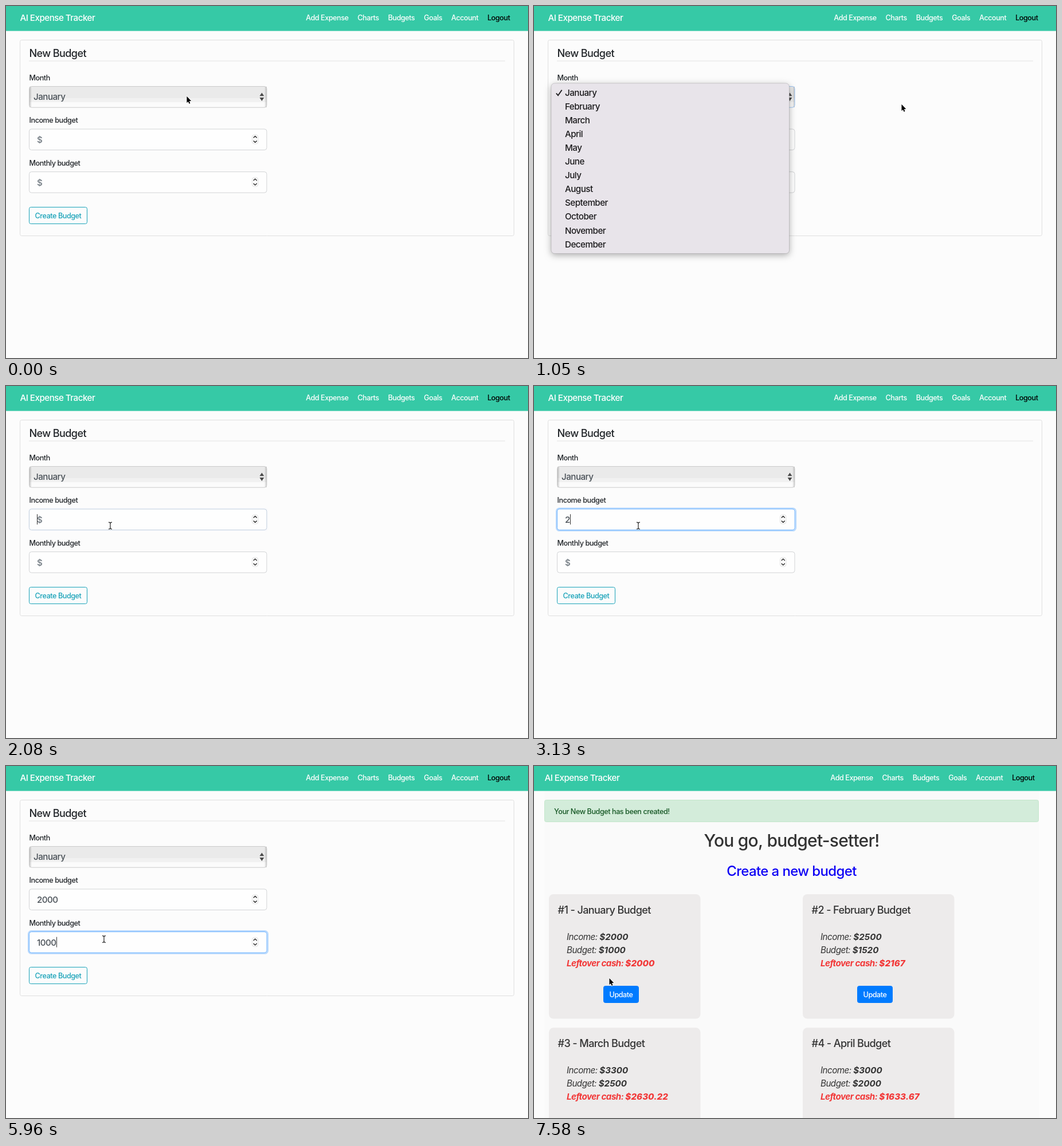
Recreate the animation shown at these times as an HTML page with a canvas. Size 911 px wide and 615 px high, loop 8 s.

```html
<!DOCTYPE html>
<html lang="en">
<head>
<meta charset="utf-8">
<title>AI Expense Tracker</title>
<style>
  html, body { margin: 0; width: 100%; height: 100%; overflow: hidden; background: #fcfcfc; }
  canvas { display: block; }
</style>
</head>
<body>
<canvas id="stage" width="911" height="615"></canvas>
<script>
const ctx = document.getElementById('stage').getContext('2d');
const LOOP = 8000;
const TICK = 148.6;

const MENU_OPEN = 1, MENU_CLOSE = 10, SAVED = 51;
const easeOut = k => 1 - (1 - k) ** 2;
const easeInOut = k => k < 0.5 ? 4 * k ** 3 : 1 - 4 * (1 - k) ** 3;

// Pointer strokes; bow bends the path downwards.
const STROKES = [
  { from: 4, to: 7, x: 641, y: 171, bow: -18, ease: easeOut },
  { from: 9.1, to: 14, x: 182, y: 244, bow: 13, ease: easeInOut },
  { from: 27, to: 31, x: 171, y: 302.5, bow: 0, ease: easeInOut },
  { from: 44, to: 48, x: 131, y: 370, bow: 0, ease: easeInOut },
];

const FIELDS = [
  { y: 215, value: '2000', focus: 13.8, blur: 30.6, start: 20, rate: 0.75 },
  { y: 289.7, value: '1000', focus: 31, blur: 49.33, start: 34.8, rate: 0.6 },
];

const MONTHS = ['January', 'February', 'March', 'April', 'May', 'June', 'July', 'August',
  'September', 'October', 'November', 'December'];
const NAV = ['Add Expense', 'Charts', 'Budgets', 'Goals', 'Account', 'Logout'];
const BUDGETS = ['$2000 $1000 $2000', '$2500 $1520 $2167', '$3300 $2500 $2630.22', '$3000 $2000 $1633.67'];

const INK = '#212529', DARK = '#333', RED = '#f23838', FIELD_INK = '#495057', TEAL = '#17a2b8';
const SMALL = 12.6, BODY = 15.2, TITLE = 18.1;

const clamp = v => Math.max(0, Math.min(1, v));
const fade = (t, on, off = Infinity) => clamp(t - on) * (1 - clamp(t - off));
const mix = (a, b, k) => `rgb(${a.map((v, i) => Math.round(v + (b[i] - v) * k))})`;

function setFont(size, style, tracking) {
  ctx.font = `${style} ${size}px Inter, sans-serif`;
  ctx.letterSpacing = `${size * tracking}px`;
}

// y is the middle of the capital letters; returns the advance width.
function text(str, x, y, size, color, { style = '450', align = 'left', tracking = -0.035 } = {}) {
  setFont(size, style, tracking);
  ctx.textAlign = align;
  ctx.fillStyle = color;
  ctx.fillText(str, x, y + size * 0.363);
  return ctx.measureText(str).width;
}

function box(x, y, w, h, r, fill, stroke, line = 1) {
  ctx.beginPath();
  ctx.roundRect(x, y, w, h, r);
  if (fill) { ctx.fillStyle = fill; ctx.fill(); }
  if (stroke) { ctx.strokeStyle = stroke; ctx.lineWidth = line; ctx.stroke(); }
}

function rect(x, y, w, h, color) {
  ctx.fillStyle = color;
  ctx.fillRect(x, y, w, h);
}

function trace(points, closed) {
  ctx.beginPath();
  points.forEach(([x, y]) => ctx.lineTo(x, y));
  if (closed) ctx.closePath();
}

function pointerAt(t) {
  let x = 315, y = 157;
  for (const s of STROKES) {
    const k = clamp((t - s.from) / (s.to - s.from)), e = s.ease(k);
    x += (s.x - x) * e;
    y += (s.y - y) * e + s.bow * Math.sin(Math.PI * k);
  }
  return [x, y];
}

function header(shift) {
  rect(0, 0, 911, 43.6, '#36c9a6');
  text('AI Expense Tracker', 24.5 + shift, 20.2, BODY, '#fff');
  let right = 879.5 + shift;
  for (const label of [...NAV].reverse())
    right -= 15.8 + text(label, right, 20.7, SMALL, label === 'Logout' ? '#000' : '#fff', { align: 'right' });
}

function ring(y, h, amount) {
  box(39.2, y - 1.3, 417.6, h + 2.6, 5, null, `rgba(0,123,255,${0.27 * amount})`, 2.6);
}

function select(t) {
  rect(41, 141, 414, 36, '#fbfbfb');
  rect(41, 141, 414, 27, '#f1f1f1');
  rect(41, 141, 414, 20, '#eaeaea');
  for (const edge of [41, 455]) {
    const inner = edge === 41 ? 45 : 451;
    const shade = ctx.createLinearGradient(edge, 0, inner, 0);
    shade.addColorStop(0, 'rgba(0,0,0,0.2)');
    shade.addColorStop(1, 'rgba(0,0,0,0)');
    rect(Math.min(edge, inner), 141, 4, 36, shade);
  }
  const focused = t >= MENU_OPEN && t < FIELDS[0].focus;
  box(40.5, 140.5, 414.5, 36.7, 4, null, focused ? '#9cc4f2' : '#cbcbcb');
  ring(140.5, 36.7, fade(t, MENU_CLOSE, FIELDS[0].focus - 1));
  text('January', 48, 158.7, BODY, FIELD_INK);
  ctx.fillStyle = '#4a4a4a';
  for (const d of [-1, 1]) {
    trace([[442.6, 158.7 + d * 1.4], [450.4, 158.7 + d * 1.4], [446.5, 158.7 + d * 7.2]], true);
    ctx.fill();
  }
}

function caretOn(t, { value, focus, blur, start, rate }) {
  if (t < focus || t >= blur) return false;
  const lastKey = start + (value.length - 1) / rate;
  if (t > start && t < lastKey) return true;
  return Math.floor((t - (t < lastKey ? focus : lastKey)) / 3.15) % 2 === 0;
}

function numberField(t, field) {
  const { y, value, focus, blur, start, rate } = field;
  const glow = fade(t, focus, blur), mid = y + 18.4;
  box(40.5, y, 414.5, 36.5, 4, '#fefefe', mix([210, 212, 214], [128, 189, 255], glow));
  ring(y, 36.5, glow ** 2);
  const typed = value.slice(0, Math.max(0, Math.ceil((t - start) * rate)));
  if (!typed) text('$', 54, mid, BODY, '#6c757d');
  const width = text(typed, 54, mid, BODY, FIELD_INK);
  if (caretOn(t, field)) rect(Math.round(54 + width), y + 9, 1, 18, '#333');

  box(429.5, mid - 8.5, 10.5, 16, 4, '#fafafa', '#e2e2e2');
  ctx.strokeStyle = '#222';
  ctx.lineWidth = 1.4;
  for (const d of [-1, 1]) {
    const base = mid - 0.6 + d * 2.6;
    trace([[431.8, base], [434.8, base + d * 2.8], [437.8, base]]);
    ctx.stroke();
  }
}

function button(label, x, y, w, fill, color, border) {
  box(x + 0.5, y + 0.5, w - 1, 29, 3, fill, border);
  text(label, x + w / 2, y + 15.3, SMALL, color, { align: 'center' });
}

function menu(open, hover) {
  ctx.save();
  if (open) {
    ctx.shadowColor = 'rgba(0,0,0,0.32)';
    ctx.shadowBlur = 12;
    ctx.shadowOffsetY = 3;
    box(30, 135, 415.5, 297.5, 6, '#e8e4ea');
    ctx.shadowColor = 'transparent';
    box(30, 135, 415.5, 297.5, 6, null, 'rgba(0,0,0,0.17)', 0.8);
    if (hover) box(35, 139, 405.5, 24, 4, '#4b93f6');
  } else {
    // While closing, only faint labels and the lower shadow remain.
    box(26, 402, 424, 37.5, [0, 0, 14, 14], 'rgba(0,0,0,0.03)');
    ctx.globalAlpha = 0.19;
  }
  const ink = i => hover && !i ? '#fff' : '#1b1a1c';
  MONTHS.forEach((m, i) => text(m, 54, 151.2 + i * 24.08, BODY, ink(i)));
  ctx.strokeStyle = ink(0);
  ctx.lineWidth = 1.9;
  trace([[38.8, 152.5], [42, 156.3], [48.6, 146.8]]);
  ctx.stroke();
  ctx.restore();
}

function cursor(x, y) {
  const beam = x > 41 && x < 455 && FIELDS.some(f => y > f.y && y < f.y + 37);
  ctx.save();
  ctx.translate(x, y);
  ctx.lineJoin = 'round';
  if (beam) {
    ctx.strokeStyle = '#222';
    ctx.lineWidth = 1.2;
    for (const d of [-1, 1]) {
      trace([[-3, d * 5.8], [-1, d * 5.6], [0, d * 4.5], [1, d * 5.6], [3, d * 5.8]]);
      ctx.stroke();
    }
    trace([[0, -4.5], [0, 4.5]]);
    ctx.stroke();
  } else {
    trace([[0.5, 0.8], [0.5, 12.2], [3, 9.9], [4.6, 13.8], [6.5, 13], [4.8, 9.2], [8.3, 9]], true);
    ctx.strokeStyle = '#fff';
    ctx.lineWidth = 1.8;
    ctx.stroke();
    ctx.fillStyle = '#000';
    ctx.fill();
  }
  ctx.restore();
}

function formPage(t, pointerX) {
  header(0);
  box(24.5, 59.5, 862, 342, 3, null, '#dfdfdf');
  text('New Budget', 40.5, 82.3, TITLE, INK);
  rect(40, 95.5, 831, 1, '#e3e3e3');
  ['Month', 'Income budget', 'Monthly budget'].forEach((label, i) =>
    text(label, 40.5, 125 + i * 74.6, SMALL, INK));
  select(t);
  FIELDS.forEach(f => numberField(t, f));
  const hover = fade(t, 46.8);
  button('Create Budget', 40, 351, 102, `rgba(23,162,184,${hover})`,
    mix([23, 162, 184], [255, 255, 255], hover), TEAL);
  if (t >= MENU_OPEN && t <= MENU_CLOSE) menu(t < MENU_CLOSE, pointerX < 445);
}

function budgetCard(amounts, i) {
  const x = 26 + (i % 2) * 443, y = 224 + (i >> 1) * 233.3;
  box(x, y, 264.5, 217.5, 8, '#edebeb');
  text(`#${i + 1} - ${MONTHS[i]} Budget`, x + 15.5, y + 27.2, TITLE, DARK, { style: '550' });
  amounts.split(' ').forEach((amount, row) => {
    const last = row === 2, color = last ? RED : DARK, mid = y + 74.2 + row * 23.2;
    const label = ['Income: ', 'Budget: ', 'Leftover cash: '][row];
    const width = text(label, x + 31, mid, BODY, color, { style: last ? 'italic 650' : 'italic 450' });
    text(amount, x + 31 + width, mid, BODY, color, { style: last ? 'italic 850' : 'italic 750', tracking: 0 });
  });
  button('Update', x + 95, y + 160, 62, '#007bff', '#fff', '#007bff');
}

function budgetsPage() {
  rect(18, 43.6, 863, 572, '#fafafa');
  header(-6);
  box(18.5, 59.5, 862, 38, 3, '#d3ecda', '#c3e6cb');
  text('Your New Budget has been created!', 35, 79, SMALL, '#155724');
  const heading = { style: '550', align: 'center', tracking: -0.026 };
  text('You go, budget-setter!', 449.5, 130.3, 30, DARK, heading);
  text('Create a new budget', 449.5, 183, 24, '#0d00f5', heading);
  BUDGETS.forEach(budgetCard);
}

function draw(t) {
  const [x, y] = pointerAt(t);
  rect(0, 0, 911, 615, '#fcfcfc');
  if (t >= SAVED) budgetsPage();
  else formPage(t, x);
  cursor(x, y);
}

const start = performance.now();
function frame() {
  const now = Math.max(0, performance.now() - start) % LOOP;
  draw(Math.min(SAVED, Math.floor(now / TICK)));
  requestAnimationFrame(frame);
}
frame();
</script>
</body>
</html>
```
